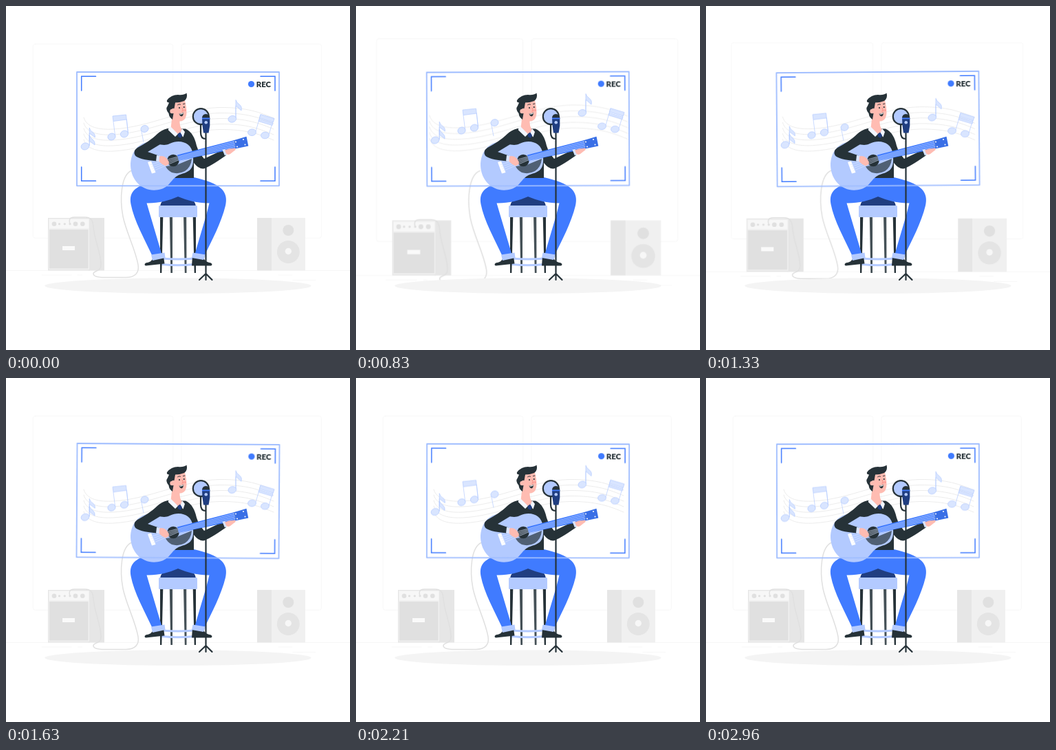
Recreate the animation shown at these times as an HTML page. Size 500x500 px, loop 3000 ms.

```html
<!DOCTYPE html>
<html lang="en">
<head>
<meta charset="utf-8">
<title>Guitar recording session</title>
<style>
html, body { margin: 0; width: 100%; height: 100%; overflow: hidden; background: #fff; }
svg { display: block; width: 100vw; height: 100vh; }
.room { transform-origin: 250px 226px; animation: swell 3s linear infinite; }
.notes { animation: float 1.5s linear infinite; }
.screen { transform-origin: 250px 178.5px; animation: sway 1.5s linear infinite; }
@keyframes swell { 0%, 50%, 100% { transform: scale(1); } 25% { transform: scale(1.05); } }
@keyframes float { 0%, 100% { transform: translateY(0); } 50% { transform: translateY(-10px); } }
@keyframes sway {
  0%, 100% { transform: rotate(0deg); }
  25% { transform: rotate(1deg); }
  75% { transform: rotate(-1deg); }
}
.line { fill: none; stroke-linecap: round; stroke-linejoin: round; }
.blue { fill: #407bff; }
.pale { fill: #b3caff; }
.navy { fill: #203e80; }
.dark { fill: #263238; }
.skin { fill: #ffbcb2; }
.g1 { fill: #f0f0f0; }
.g2 { fill: #e6e6e6; }
.g3 { fill: #e0e0e0; }
.notes { fill: #d9e5ff; stroke: #b3caff; stroke-width: .7; stroke-linejoin: round; }
.rec { font: 900 11.4px Lato, sans-serif; }
</style>
</head>
<body>
<svg viewBox="0 0 500 500">
  <g class="room">
    <g class="line" stroke="#f5f5f5" stroke-width=".7">
      <rect x="39.3" y="55.3" width="203.4" height="282" rx="3"/>
      <rect x="255" y="55.3" width="203.4" height="282" rx="3"/>
    </g>
    <path class="line" stroke="#ebebeb" stroke-width=".4"
      d="M0 384.5H500M52.5 391H95M104.500 391h6M416.800 398.500h33M396.600 391h19"/>
    <g id="staves" class="line" stroke="#e8e8e8" stroke-width=".8"></g>

    <path class="g2" d="M120 308h23v76.500h-23z"/>
    <path class="g2" d="M61 308h61v76.500h-61z"/>
    <path class="g1" d="M62 309h59v74h-59z"/>
    <path fill="#f7f7f7" d="M63 310h57v13h-57z"/>
    <path class="g3" d="M63 325h56.500v56.500h-56.500z"/>
    <path fill="#fafafa" d="M82 349h18v6h-18z"/>
    <g class="g3">
      <circle cx="70" cy="316.800" r="3.300"/><circle cx="101" cy="316.800" r="3.300"/>
      <circle cx="111.300" cy="316.800" r="3.300"/><circle cx="77.500" cy="316.800" r="1.600"/>
      <circle cx="85.300" cy="316.800" r="1.600"/><circle cx="93" cy="316.800" r="1.600"/>
    </g>
    <path class="line" stroke="#e0e0e0" stroke-width="1.500"
      d="M93 317C91 310 93 307 99 307H115C124 307 126 312 127 320C128 340 138 358 138 376C138 387 127 384 127 389C127 393 134 394.500 143 394.500H174C188 394.500 194 387 192 376C188 353 175 330 170 306C165 280 167 245 183 239"/>

    <path class="g2" d="M365 308h21v76.500h-21z"/>
    <path class="g1" d="M386 308h49v76.500h-49z"/>
    <circle class="g3" cx="410.300" cy="326" r="8"/>
    <circle fill="#e4e4e4" cx="410.300" cy="357.500" r="16.500"/>
    <circle fill="#f7f7f7" cx="410.300" cy="356.500" r="4.700"/>
  </g>

  <ellipse cx="250" cy="406.700" rx="193.700" ry="11.300" fill="#f4f4f4"/>

  <g class="notes">
    <path d="M121.200 203V177Q122 181 126 183.500Q130 186 129.300 191L121.200 185ZM121.200 188Q122 191 126 194Q130 197 129 202L121.200 196Z"/>
    <ellipse cx="115" cy="204" rx="6" ry="4.900" transform="rotate(-20 115 204)"/>
    <path d="M158.700 189L155 160L174.500 158L177.500 185L175.300 165L156 167.500"/>
    <ellipse cx="153.500" cy="190" rx="5.700" ry="4.900" transform="rotate(-20 153.500 190)"/>
    <ellipse cx="172" cy="186" rx="5.700" ry="4.900" transform="rotate(-20 172 186)"/>
    <path d="M196.500 180L200 198"/>
    <ellipse cx="201.500" cy="178.500" rx="5.600" ry="4.900" transform="rotate(-20 201.500 178.500)"/>
    <path d="M334 163V136.500Q335 140 339 143Q343.500 146 342 152L334 145Z"/>
    <ellipse cx="328.800" cy="164.300" rx="5.900" ry="4.800" transform="rotate(-15 328.800 164.300)"/>
    <path fill="none" d="M363 182L370 158M382 187L389 164"/>
    <path d="M370 157.500L390 163.500L388.300 169L368.400 163ZM368 164.500L388 170.500L387 173.500L367 167.500Z"/>
    <ellipse cx="357.500" cy="183.700" rx="6" ry="4.800" transform="rotate(-5 357.500 183.700)"/>
    <ellipse cx="376.500" cy="188" rx="6" ry="4.800" transform="rotate(-5 376.500 188)"/>
  </g>

  <!-- stool -->
  <path fill="#455157" d="M237.800 306H242L242 388H239.300ZM258 306H262.200L262.500 388H259.800Z"/>
  <path class="line" stroke="#b3caff" stroke-width="2.800" d="M227 367Q250 369 273 367M227 375.500Q250 378 273 375.500"/>
  <path class="dark" d="M224 306H228.300L226.300 388H224ZM271.700 306H276L276 388H273.700Z"/>
  <path class="navy" d="M224 291Q225 283 232 280L250 274L268 280Q275 283 276 291Z"/>
  <rect class="pale" x="222" y="290" width="56" height="17" rx="1.500"/>

  <!-- legs -->
  <path class="dark" d="M214 365L229 364L230.500 374.500L203 377.500Q200 376 203 373.500Q213 372 214 365Z"/>
  <path class="dark" d="M271 364L286 365Q289 372 298 373.500Q301 376 298 377.500H270Z"/>
  <path class="blue" d="M242 249H273C290 253 306 258 314 266.500C320 273 321 281 319 290C313 315 299 341 288.500 363L274.500 361C281 337 290 310 295.500 286.500C280 287 265 283 250 277C236 283 221 287 204.500 286.500L226.500 361L213 364C201 338 186 312 181.500 288C180 279 181 272 188 266C201 256 222 252 242 249Z"/>
  <path class="pale" d="M211 361.500L230.500 358.500L231.500 366L213 370ZM271.500 358.500L290.500 361.500L287 369L270 366Z"/>

  <!-- body -->
  <path class="dark" d="M236 178Q226 180 219 187L204 206V240H243V250H273V228Q280 237 287 236.500Q296 234 320 217L315 209Q299 217 288 222Q280 213 277 203Q273 184 261 178.500Z"/>
  <path class="skin" d="M241.500 160L252.500 166Q252 175 256 180L251.500 188L239.500 178Z"/>
  <path fill="#f2f6ff" d="M239.500 175.500L250 186L246 190L235 179.500ZM256 178L260 183L257.500 190.500L253 186Z"/>
  <path class="navy" d="M249.500 186L253 183.500L256 188L254 192L250 190Z"/>

  <!-- head -->
  <path class="skin" d="M242 142L260 137Q262.500 147 262.500 155Q262 167 253 167.500Q245 167 241 157Z"/>
  <path class="dark" d="M234 137Q240 129 250 129Q258 130 262.500 126.500Q264.500 134 259 138Q252 140.500 246 140.500L244.500 149Q241 148 240.500 152Q241 155 243.500 156L242 165Q237 162 236.500 156Q231 150 235 145L237 140.500Q233 140 234 137Z"/>
  <circle class="skin" cx="241.500" cy="153" r="3.200"/>
  <circle cx="260.300" cy="151.500" r="1.500" fill="#ff9e97"/>
  <path class="line" stroke="#263238" stroke-width="1" d="M249.500 143.700Q251 142 253.500 143M257.500 142.500L260 142"/>
  <circle class="dark" cx="252" cy="148" r="1.100"/><circle class="dark" cx="258.800" cy="147" r="1.100"/>
  <path class="line" stroke="#f07f77" stroke-width=".8" d="M256 148L257.700 152.500L255.500 153"/>
  <path class="dark" d="M251.500 156.500Q255 157 258 154.500Q258 160 255 160.500Q252.500 160 251.500 156.500Z"/>
  <path fill="#fff" d="M252 156.600Q255 157 257.800 155L257.500 156.500Q255 158 252.500 157.500Z"/>

  <!-- guitar -->
  <path class="pale" d="M181 232C181 211 194 198 208 198C221 199 228 205 238 200C252 193 270 198 271.500 215C275 240 264 241 253 245C241 249 239 262 226 266C203 273 182 257 181 232Z"/>
  <path fill="#506074" d="M232 233L248 231L270 222Q269 234 260 240Q251 245 241 242Q235 239 232 233Z"/>
  <circle class="dark" cx="243" cy="224.500" r="8.700"/>
  <path class="blue" d="M249 216.500L330 195.500L333 207.500L251 225Z"/>
  <path fill="#396fe6" d="M330 195.500L349.500 189.800L352.300 203.500L333 207.500Z"/>
  <path fill="#fff" d="M206 227L211 225.500L217.500 242L212 243.500Z"/>
  <g id="strings" class="line" stroke="#d9e5ff" stroke-width=".7"></g>
  <g fill="#fff">
    <circle cx="334" cy="197.500" r="1"/><circle cx="345" cy="194" r="1"/>
    <circle cx="336" cy="204.500" r="1"/><circle cx="347.500" cy="201.500" r="1"/>
  </g>

  <!-- arms over the guitar -->
  <path class="dark" d="M236 178Q226 180 219 187Q208 197 191 206Q184 211 187.500 217Q192 223 219 225.500L222 217.500L206 212L234 195Z"/>
  <path fill="#d9e5ff" d="M219 217L223.500 217.500L223 226L218 225.500ZM314.500 209L318.500 208L321 215.500L318 217.500Z"/>
  <path class="skin" d="M223 218.500Q229 217 233 221Q238 226 236.500 230L232 232.500Q226 230 222.500 226Z"/>
  <path class="skin" d="M318 209.500L324 207.500L333 206.500Q335 209 331 211L326 215Q322 217 320 214.500Z"/>

  <g class="screen">
    <rect class="line" x="103" y="96" width="294" height="165.300" stroke="#9fbdff" stroke-width="1.800"/>
    <path class="line" stroke="#407bff" stroke-width="1.500" stroke-linecap="butt" style="stroke-linejoin:miter"
      d="M109.700 123V102.300H130.500M370 102.300H391V123M109.700 234V254.300H130.500M370 254.300H391V234"/>
    <circle class="blue" cx="356.500" cy="113.500" r="4.600"/>
    <text class="rec dark" x="363.700" y="118">REC</text>
  </g>

  <!-- microphone -->
  <g class="line" stroke="#263238" stroke-width="2.200">
    <path d="M290.500 184V398M281 398L290.500 389L299.500 398"/>
    <path d="M283 172V184Q283 193 290 193"/>
    <circle cx="283.300" cy="160.700" r="11.500" fill="#b3caff"/>
  </g>
  <path class="dark" d="M285 163.500Q285 157 290.500 157Q296.300 157 296.300 163.500Z"/>
  <path class="navy" d="M285 163H296.300V174L294.500 184.500H287L285.500 174Z"/>
  <path class="blue" d="M285 162.500H296.300V164.300H285Z"/>
  <circle class="pale" cx="290.700" cy="169.300" r="2.300"/>
</svg>
<script>
const addPath = (id, d) => {
  const path = document.createElementNS("http://www.w3.org/2000/svg", "path");
  path.setAttribute("d", d);
  document.getElementById(id).append(path);
};
for (let i = 0; i < 5; i++) {
  const y = i * 8;
  addPath("staves", `M113 ${162 + y}C117 ${177 + y} 136 ${180 + y} 156 ${179 + y}` +
    `C210 ${176 + y} 255 ${149 + y} 310 ${147.500 + y}C350 ${147 + y} 370 ${155 + y} 389 ${163 + y}`);
}
for (let i = 0; i < 4; i++) {
  addPath("strings", `M${210.500 + i * 1.300} ${230.500 + i * 3}L${248 + i * .3} ${219.500 + i * 1.700}L${332 + i * .4} ${197 + i * 2.400}`);
}
</script>
</body>
</html>
```
